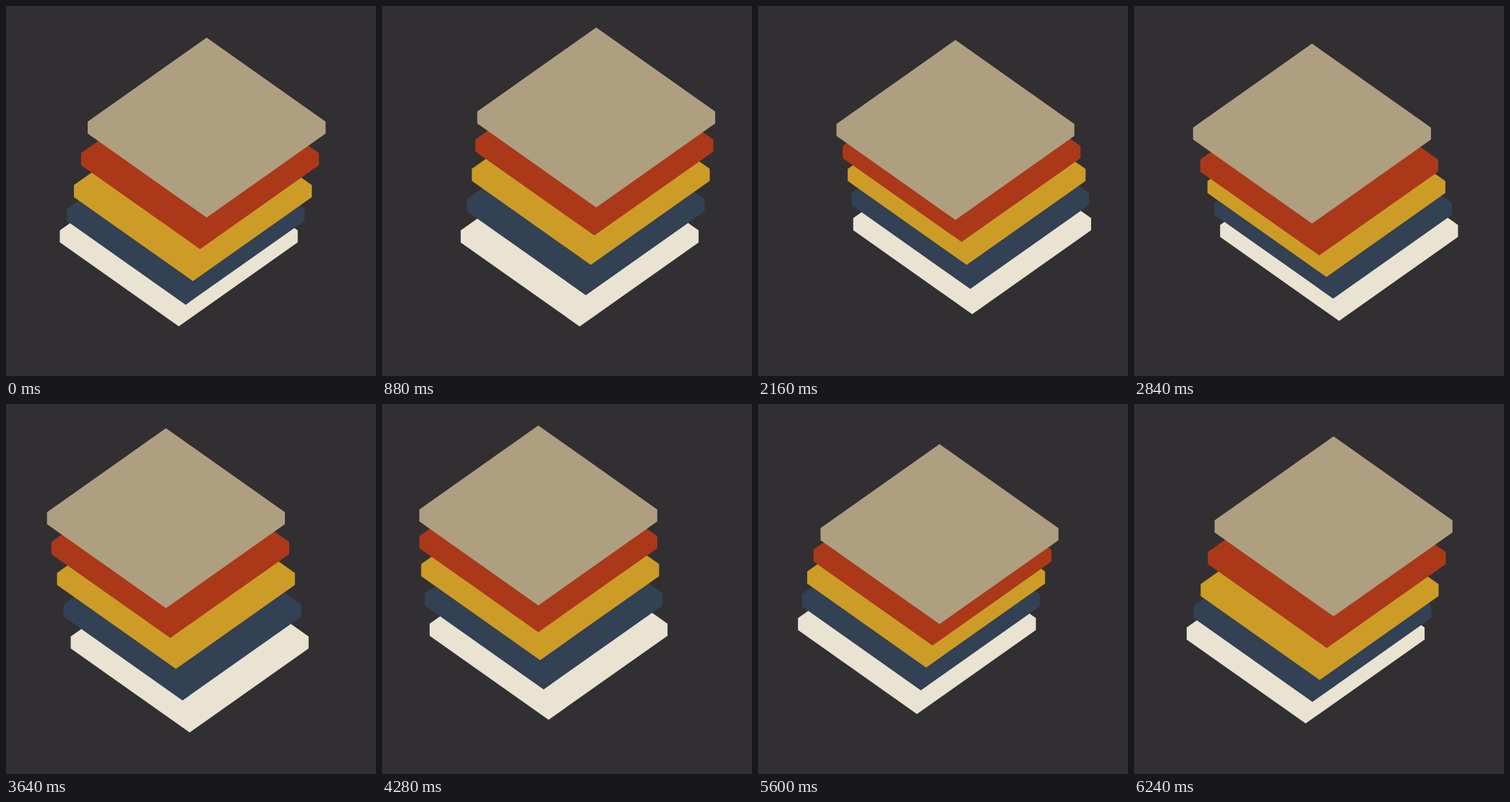
Animation, 512 px wide and 512 px high, one loop 6280 ms. Source, as an HTML page:

```html
<!DOCTYPE html>
<html lang="en">
<head>
<meta charset="utf-8">
<title>Swaying stack</title>
<style>
  html, body { margin: 0; width: 100%; height: 100%; overflow: hidden; background: #322f32; }
  svg { display: block; width: 100%; height: 100%; }
</style>
</head>
<body>
<svg id="stage" viewBox="0 0 512 512"></svg>
<script>
  const LOOP = 6280, STEP = 40;
  const SWAY = 40.4, BOUNCE = 30, LAG = 0.249;
  const CENTER_X = 256.4, TOP_Y = 308.5, GAP = 36.9;
  const colors = ['#ae9f80', '#ab3919', '#cd9c26', '#324153', '#eae3d2']; // top to bottom

  // Slab outline, measured from its lowest corner
  const slab = '0,0 164.6,-116.2 164.6,-132.8 0,-249 -164.6,-132.8 -164.6,-116.2';

  const stage = document.getElementById('stage');
  const layers = colors.map(color => {
    const shape = document.createElementNS('http://www.w3.org/2000/svg', 'polygon');
    shape.setAttribute('points', slab);
    shape.setAttribute('fill', color);
    stage.prepend(shape);
    return shape;
  });

  function draw(ms) {
    const time = Math.floor((ms % LOOP) / STEP) * STEP / 1000;
    layers.forEach((shape, i) => {
      const swing = Math.sin(time + 0.553 - LAG * i);
      const x = CENTER_X + SWAY * swing;
      const y = TOP_Y + GAP * i - BOUNCE * Math.abs(swing);
      shape.setAttribute('transform', `translate(${x.toFixed(2)} ${y.toFixed(2)})`);
    });
  }

  let start;
  function tick(now) {
    start ??= now;
    draw(Math.max(0, now - start));
    requestAnimationFrame(tick);
  }
  draw(0);
  requestAnimationFrame(tick);
</script>
</body>
</html>
```
